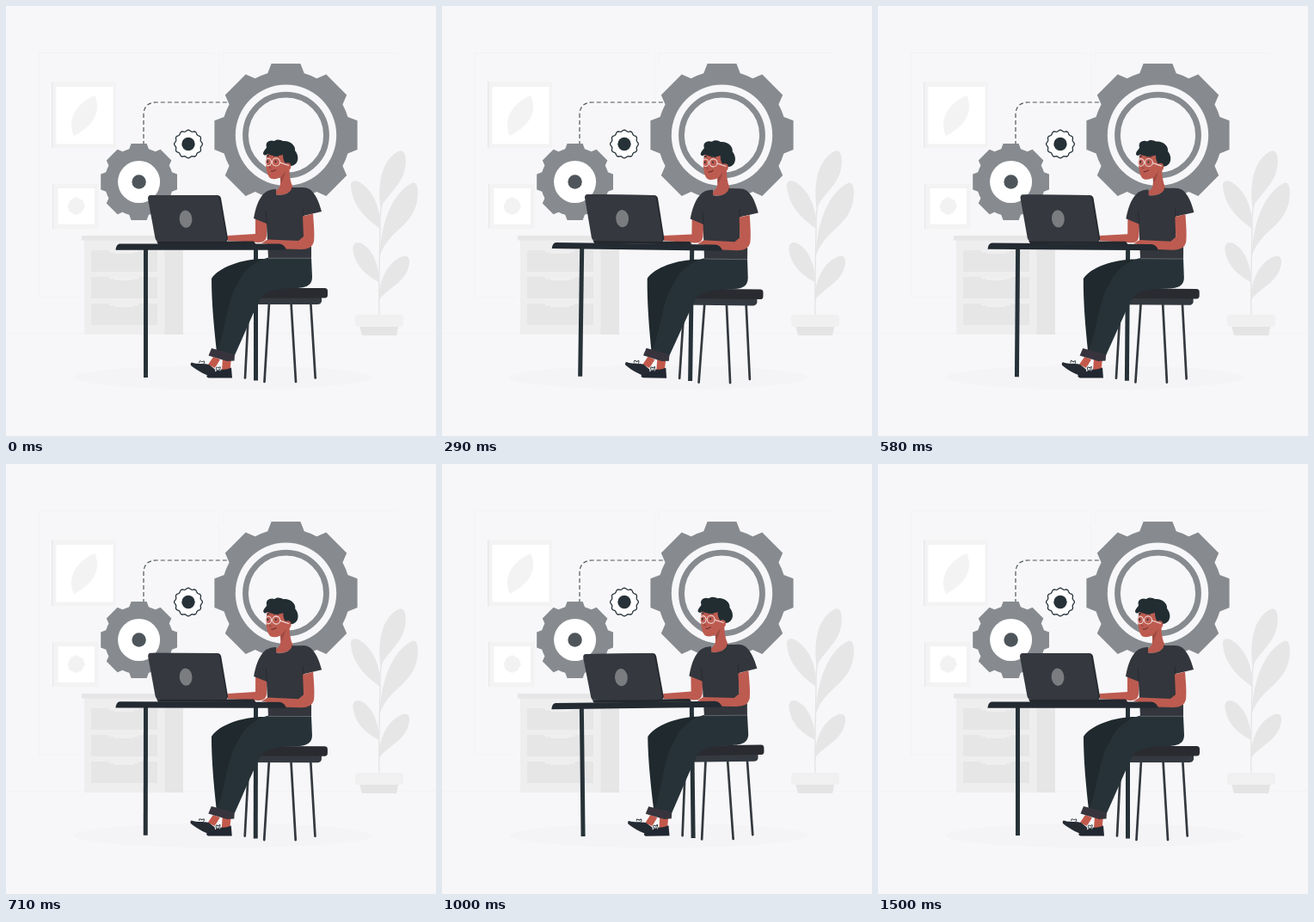
These frames come from a looping animation (500x500 px, 1540 ms). An HTML page:

```html
<!DOCTYPE html>
<html lang="en">
<head>
<meta charset="utf-8">
<title>Working at a desk</title>
<style>
  html, body { margin: 0; width: 100%; height: 100%; overflow: hidden; background: #f7f7f9; }
  svg { display: block; width: 100vw; height: 100vh; }
</style>
</head>
<body>
<svg viewBox="0 0 500 500" xmlns="http://www.w3.org/2000/svg">
  <defs>
    <g id="drawer">
      <path d="M99 0H176V25H99Z" fill="#e6e6e7"/>
      <path d="M119 0H155L153 2.500H148V4H126V2.500H121Z" fill="#efeff0"/>
    </g>
  </defs>

  <!-- room -->
  <g fill="none" stroke="#f3f3f5">
    <path d="M38.500 338V54.500H243M252.500 70V54.500H456M247.500 54V110M0 380.500H500M38 338H88"/>
  </g>
  <ellipse cx="252" cy="432" rx="174" ry="14" fill="#f4f4f6"/>

  <!-- pictures -->
  <path d="M53 88H128V165H53Z" fill="#f3f3f4"/>
  <path d="M53 88H54.300V165H53Z" fill="#e8e8e9"/>
  <path d="M58.500 94H124.500V160.500H58.500Z" fill="#fff"/>
  <path d="M103 104C110 119 106 137 79 151C72 137 76 116 103 104Z" fill="#f3f3f4"/>
  <path d="M54 207H107.500V259H54Z" fill="#f3f3f4"/>
  <path d="M54 207H55.200V259H54Z" fill="#e9e9ea"/>
  <path d="M60.500 212H103V254H60.500Z" fill="#fff"/>
  <path d="M81.500 222L89 226L92 233L88 240L81.500 243L74 239.500L71.500 233L75 225.500Z" fill="#f2f2f3"/>

  <!-- drawers -->
  <path d="M91 272H206V382H91Z" fill="#eeeeef"/>
  <path d="M184.500 272H206V382H184.500Z" fill="#e6e6e7"/>
  <path d="M88 267H206V272.500H88Z" fill="#e6e6e7"/>
  <use href="#drawer" y="284"/>
  <use href="#drawer" y="315"/>
  <use href="#drawer" y="346"/>

  <!-- plant -->
  <g fill="#e6e6e7">
    <path d="M434 360C433 320 435 285 435 250C435 225 444 205 452 190" fill="none" stroke="#e3e3e4" stroke-width="1.300"/>
    <path d="M435.500 235C432 208 436 180 456 169C466 164 467 184 462 196C457 210 443 220 435.500 235Z"/>
    <path d="M435 290C435 260 446 219 472 206C481 202 481 226 474 239C465 258 444 264 435 290Z"/>
    <path d="M435 259C423 250 403 235 401 210C400 202 408 202 413 206C427 216 436 234 435 259Z"/>
    <path d="M434 321C421 315 406 303 403.500 284C402.500 275 408 273 415 277C427 284 434 303 434 321Z"/>
    <path d="M433.500 342C433 321 443 299 459 292C468 288 471 294 468 304C463 322 444 328 433.500 342Z"/>
    <path d="M411 372H456.500L454 383H414Z" fill="#e4e4e5"/>
    <rect x="406" y="359" width="56" height="14" rx="4" fill="#f0f0f1"/>
  </g>

  <!-- cogs -->
  <path d="M160 162V127Q160 112 175 112H259" fill="none" stroke="#4f555a" stroke-width="1.200" stroke-dasharray="5 3"/>
  <g transform="translate(325.500 150.200)">
    <path id="big" fill="#878b8f"/>
    <circle r="58.700" fill="#f7f7f9"/>
    <circle r="47" fill="none" stroke="#878b8f" stroke-width="6.800"/>
  </g>
  <g transform="translate(154.600 204.500)">
    <path id="mid" fill="#878b8f"/>
    <circle r="24.500" fill="#fff"/>
    <circle r="8.200" fill="#4e565b"/>
  </g>
  <g transform="translate(212 160.500)">
    <path id="small" fill="#fff" stroke="#263238" stroke-width="1.300"/>
    <circle r="7.700" fill="#263238"/>
  </g>

  <!-- desk, stool and worker -->
  <g id="scene">
    <g stroke="#34393f" stroke-width="2.700" stroke-linecap="round">
      <path d="M282.500 345L278 432.500M306 345L300.500 437M331.500 345L337 437M354.300 345L359.700 432.500"/>
    </g>
    <path d="M280 338H367V343.500Q366 347 362 347H280Z" fill="#343940"/>
    <rect x="276" y="328" width="98" height="11.500" rx="3.500" fill="#2a2b30"/>
    <path d="M288 282H293V435.500H288Z" fill="#263238"/>

    <!-- shoes and legs -->
    <path d="M241 408L249 411L243 421L235 417ZM252 409H262L260.500 424H251Z" fill="#c2594b"/>
    <path d="M216 414.500C222 417 230 415 236 417L243 422.500L244 432C235 431 222 424 215 418Q214 415 216 414.500Z" fill="#252b33"/>
    <path d="M234 429C240 429 244 425 247 422Q254 424 262 420.500L263 432.500H236Q232 431.500 234 429Z" fill="#222831"/>
    <path d="M225 415Q224 411 228 414Q232 411 230 416M245 424Q243 418 247 421Q251 417 248 424" fill="none" stroke="#fff" stroke-width="2.400"/>
    <path d="M225 415Q224 411 228 414Q232 411 230 416M245 424Q243 418 247 421Q251 417 248 424" fill="none" stroke="#263238"/>
    <path d="M300 294C274 294 247 304 239 317C239 345 242 375 245 402L260 403L288 320Z" fill="#1f292e"/>
    <path d="M305 292.500H355L356 315C356 326 347 328 335 328C318 328 303 331 297 338C286 359 277 382 266 406L246 400C256 375 257 340 270 322C276 307 290 296 305 292.500Z" fill="#263238"/>
    <path d="M239 398L266 405L265.500 412.500L257 413L235.500 406.500Z" fill="#37343d"/>

    <!-- neck and head -->
    <path d="M319 188L330 184Q328 199 334 212Q326 222 313 219Q311 217 316 213Q320 211 319 199Z" fill="#b9594f"/>
    <path d="M304 171C301 180 302 193 306 199C309 203 317 201 321 198L331 186L327 166L306 167Z" fill="#bd5b50"/>
    <path d="M319 200L325 192Q323 201 319.500 206Z" fill="#9d4a43"/>
    <path d="M299 172C299 168 303 166 303 164C301 158 307 155 312 157C316 154 320 156 322 157C330 156 337 162 336 168C341 174 341 184 332 186L326 184Q322 181 322 173Q312 176 304 172Q301 175 299 172Z" fill="#222d32"/>
    <ellipse cx="327.500" cy="186.500" rx="3.800" ry="4.300" fill="#bd5b50"/>
    <path d="M303 174.500L306 174M311 174.500Q314 173.500 317 175" fill="none" stroke="#263238" stroke-width="1.300"/>
    <path d="M308 182L306 188L308.500 188.500" fill="none" stroke="#8f403b" stroke-width=".8"/>
    <path d="M308 192Q311 193 314 190" fill="none" stroke="#5c2929"/>
    <path d="M304.200 179.700V182M313.500 179.700V182" stroke="#263238" stroke-width="1.500"/>
    <g fill="none" stroke="#f2dcda" stroke-width="1.100">
      <ellipse cx="305" cy="181.500" rx="3.300" ry="4.300"/>
      <circle cx="314" cy="181.500" r="4.500"/>
      <path d="M318.500 182L329 185.500"/>
    </g>

    <!-- arms and shirt -->
    <path d="M290 246L304 249L303 268Q302 275 294 275L258 273Q256 269 258 267L290 265Z" fill="#bd5b50"/>
    <path d="M314 213C310 213 304 214 300 218C293 225 290 236 288 247L303 253L305 293.500H355V280L346 268V244L367 239C364 228 360 218 353 213Q349 210.500 343 211L332 211Q333 214 327 218Q320 221 314 219.500Z" fill="#33363c"/>
    <path d="M305 293.300H355" stroke="#777d82" stroke-width=".7"/>
    <path d="M302 238L303.500 253M345 235L345.500 245" stroke="#25292e" stroke-width=".8"/>
    <path d="M345 244.500L357 241.500C358 254 359 266 358 274Q356 283 343 283L325 282.500L312 278L297 276L304 271.500L340 273L346 268Z" fill="#bd5b50"/>

    <!-- desk and laptop -->
    <path d="M160 282H165V432H160Z" fill="#263238"/>
    <path d="M132 276.500H318Q324 277.500 326 283.700H127.500Q128 277.500 132 276.500Z" fill="#232a31"/>
    <path d="M175 273.500H288L290.500 277H177Z" fill="#24282e"/>
    <path d="M171 220H245.500Q249 220 250 223.500L258 270Q258 274 254 274.500H180Z" fill="#25292f"/>
    <path d="M168 220H243.500Q247 220 248 223.500L256.500 270Q256.500 274 253 274H178Q174.500 274 173.500 270L165 224Q165 220 168 220Z" fill="#35383f"/>
    <ellipse cx="209" cy="247.700" rx="7.400" ry="10.200" transform="rotate(-5 209 247.700)" fill="#7a7c80"/>
  </g>
</svg>
<script>
  const $ = id => document.getElementById(id);
  const polar = (r, deg) => {
    const a = deg * Math.PI / 180;
    return (r * Math.cos(a)).toFixed(2) + ' ' + (r * Math.sin(a)).toFixed(2);
  };

  // Eight flat teeth joined by arcs along the root circle.
  function cog(tip, root) {
    let d = 'M' + polar(root, -16.5);
    for (let a = 0; a < 360; a += 45) {
      d += `L${polar(tip, a - 11.5)}L${polar(tip, a + 11.5)}L${polar(root, a + 16.5)}`;
      d += `A${root} ${root} 0 0 1 ${polar(root, a + 28.5)}`;
    }
    return d + 'Z';
  }

  function wavy(r, amp, lobes) {
    const pts = [];
    for (let a = 0; a < 360; a += 3) {
      pts.push(polar(r + amp * Math.cos(lobes * a * Math.PI / 180), a));
    }
    return 'M' + pts.join('L') + 'Z';
  }

  $('big').setAttribute('d', cog(84.8, 75));
  $('mid').setAttribute('d', cog(45.3, 40));
  $('small').setAttribute('d', wavy(15.6, 0.8, 12));

  const LOOP = 1540, SWAY = 1500, FPS = 24;
  const tick = k => Math.round(k * 100 / FPS) * 10;

  // Linear sway: 0, +1, -1, 0 degrees at 0, 1/4, 3/4 and 1.
  function angle(t) {
    const p = t / SWAY;
    if (p < 0.25) return 4 * p;
    return p < 0.75 ? 2 - 4 * p : 4 * p - 4;
  }

  function draw(ms) {
    const t = ms % LOOP;
    let k = Math.floor(t * FPS / 1000);
    if (tick(k) > t) k--;
    else if (tick(k + 1) <= t) k++;
    const deg = angle(Math.min(k * 1000 / FPS, SWAY));
    $('scene').setAttribute('transform', `rotate(${deg.toFixed(4)} 250.7 296.5)`);
  }

  const start = performance.now();
  function loop() {
    draw(performance.now() - start);
    requestAnimationFrame(loop);
  }
  loop();
</script>
</body>
</html>
```
